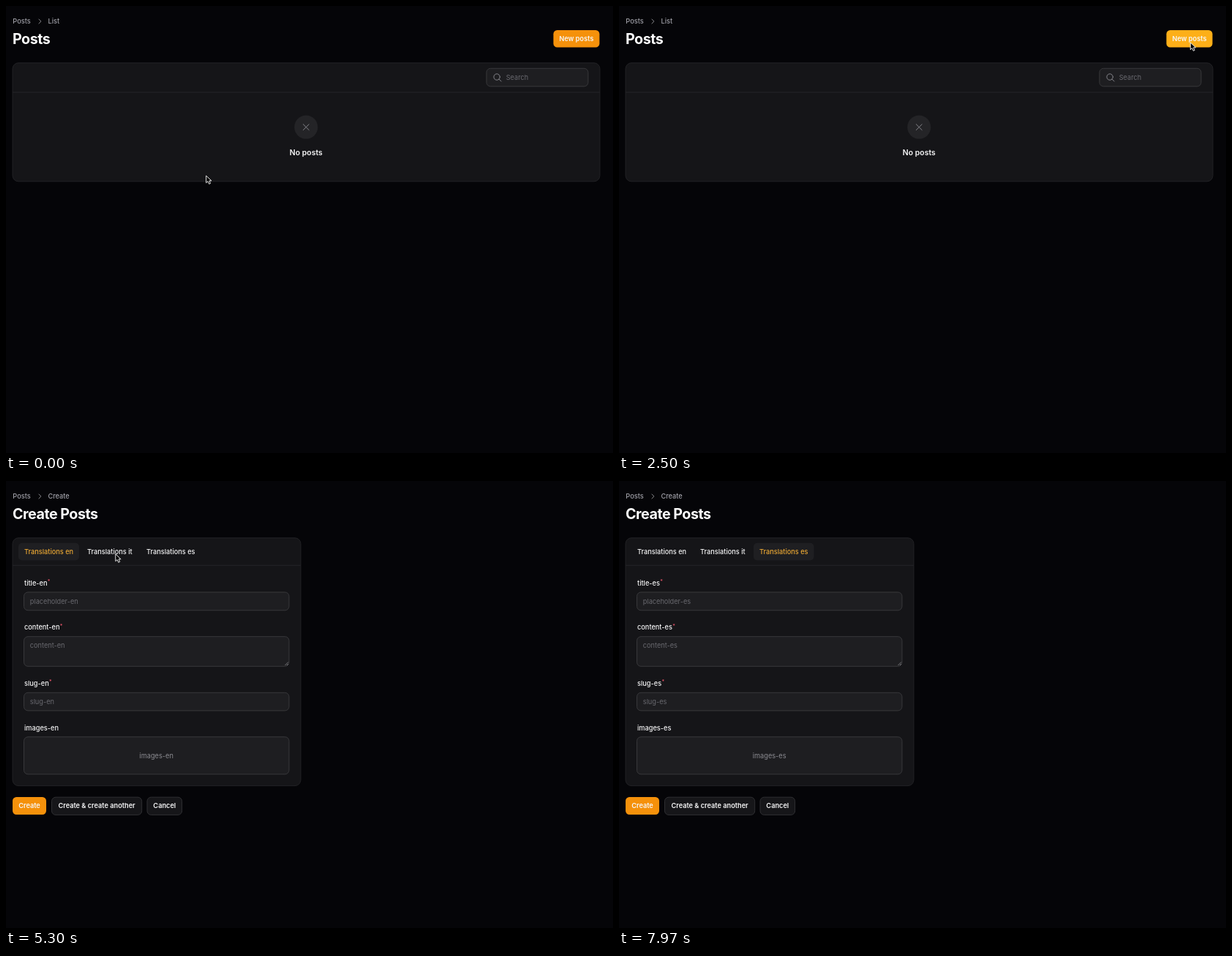
These frames come from a looping animation (830x611 px, 8 s). An HTML page:

```html
<!DOCTYPE html>
<html lang="en">
<head>
<meta charset="utf-8">
<title>Posts</title>
<style>
  html, body { margin: 0; width: 100%; height: 100%; overflow: hidden; background: #050508; }
  svg { display: block; width: 830px; height: 611px; }
  text { font: 500 9.2px Inter, sans-serif; font-optical-sizing: none; fill: #f7f7f8; white-space: pre; }
  .crumb { fill: #a0a0a8; }
  .heading { font-size: 19.65px; font-weight: 700; letter-spacing: -.025em; fill: #fff; }
  .bold { font-weight: 600; }
  .big { font-size: 10.5px; }
  .regular { font-weight: 400; }
  .hint { font-weight: 400; fill: #69696f; }
  .middle { text-anchor: middle; }
  .card { fill: #151518; stroke: #222225; }
  .field { fill: #1e1e21; stroke: #38383b; }
  .outline { fill: #161619; stroke: #2f2f32; }
  .primary { fill: #f5910b; }
  .rule { stroke: #252528; }
  .icon { fill: none; stroke: #85858b; stroke-linecap: round; stroke-linejoin: round; }
  .star { font-size: 7px; fill: #f0566b; }
</style>
</head>
<body>
<svg viewBox="0 0 830 611">
  <text class="crumb" x="9.3" y="24.3">Posts</text>
  <path class="icon" d="M44.9 18l3 3-3 3"/>
  <text class="crumb" id="crumb" x="57.5" y="24.3"></text>
  <text class="heading" id="heading" x="9" y="52"></text>
  <g id="list"></g>
  <g id="form"></g>
  <path id="cursor" d="M0 0V9.7L2.3 7.6L4 11.3L5.8 10.5L4.2 6.9H7.3Z" fill="#000" stroke="#fff" stroke-width=".9" stroke-linejoin="round"/>
</svg>
<script>
const LOOP = 8000;
const PAGE_OPEN = 3530, UPLOAD_READY = 3620, HOVER = 1680;
const $ = id => document.getElementById(id);

// Cursor stops: time, x, y; it eases from each one to the next.
const stops = [
  [0, 273.7, 232], [30, 273.7, 232], [370, 760, 90], [730, 760, 90],
  [1500, 787, 47.5], [1700, 787, 47.5], [2400, 781.3, 50], [3070, 781.3, 49.3],
  [4400, 781.3, 49.3], [5150, 150, 100], [6130, 147, 99.5], [6350, 147, 99.5],
  [6830, 197, 99], [7200, 230, 99], [LOOP, 230, 99]
];
const hidden = [[3700, 4390], [7900, LOOP]];

// Tabs: language, left edge, width, time of selection.
const tabs = [['en', 17, 83, 0], ['it', 103, 78, 5500], ['es', 184, 82.5, 7300]];

const box = (x, y, w, h, r, cls) =>
  `<rect class="${cls}" x="${x}" y="${y}" width="${w}" height="${h}" rx="${r}"/>`;
const label = (x, y, str, cls = '') => `<text class="${cls}" x="${x}" y="${y}">${str}</text>`;
const rule = (y, right) => `<path class="rule" d="M9 ${y}H${right}"/>`;

function listPage() {
  return box(748.5, 33, 63, 23.6, 5.2, 'primary" id="newButton') +
    label(780, 48.3, 'New posts', 'bold middle') +
    box(9, 77.8, 803, 162, 8, 'card') + rule(118, 812) +
    box(657, 85.3, 139, 24.6, 5.5, 'field') +
    '<g class="icon"><circle cx="671.2" cy="97" r="4.2"/><path d="M674.3 100.1l2.9 2.9"/></g>' +
    label(683.7, 101.1, 'Search', 'hint') +
    '<circle cx="410.3" cy="165.6" r="16" fill="#242427"/>' +
    '<path class="icon" d="M406.4 161.7l7.8 7.8m0-7.8l-7.8 7.8"/>' +
    label(410.3, 203.6, 'No posts', 'bold big middle');
}

function formPage(lang, uploadReady) {
  const required = (y, name) =>
    label(25, y, `${name}-${lang}<tspan class="star" dx=".3" dy="-2.6">*</tspan>`);
  const input = (y, h, hint) =>
    box(24.5, y, 362.5, h, 5.5, 'field') + label(32.8, y + 15.6, `${hint}-${lang}`, 'hint');
  const bar = uploadReady ? 432.2 : 401.8;
  const tabBar = tabs.map(([code, x, w]) => {
    const active = code === lang;
    return (active ? box(x, 84.8, w, 23.6, 5, '" fill="#1f1f22') : '') +
      `<text x="${x + 8.1}" y="99.9"${active ? ' style="fill:#eba834"' : ''}>Translations ${code}</text>`;
  }).join('');
  const upload = uploadReady
    ? box(24.5, 349.8, 362.5, 51, 5.5, 'field') +
      `<text class="regular middle" x="205.7" y="379" style="fill:#8c8c92">images-${lang}</text>`
    : box(25, 350.3, 58.7, 19.8, 0, '" fill="#606063') +
      label(30, 364, 'Scegli file', 'regular big') +
      label(86.4, 364, 'Nessun file selezionato', 'regular big');

  return box(9, 77.8, 394, bar - 93.4, 8, 'card') + rule(115.3, 403) + tabBar +
    required(142.6, 'title') + input(152, 24.8, 'placeholder') +
    required(203.3, 'content') + input(212.7, 40.6, 'content') +
    '<path d="M381.5 252l4.5-4.5m-2 4.5l2-2" stroke="#a0a0a4" stroke-width=".7"/>' +
    required(279.8, 'slug') + input(289.3, 24.6, 'slug') +
    label(25, 340.6, `images-${lang}`) + upload +
    box(9, bar - .3, 46, 24, 5.2, 'primary') + label(32, bar + 15.2, 'Create', 'bold middle') +
    box(62.5, bar, 123.2, 24.2, 5.5, 'outline') +
    label(124.1, bar + 15.2, 'Create &amp; create another', 'bold middle') +
    box(193, bar, 47.6, 24.2, 5.5, 'outline') + label(216.8, bar + 15.2, 'Cancel', 'bold middle');
}

function cursorAt(t) {
  const i = stops.findIndex(s => s[0] > t);
  const [t0, x0, y0] = stops[i - 1], [t1, x1, y1] = stops[i];
  const u = (t - t0) / (t1 - t0), e = u * u * (3 - 2 * u);
  return [x0 + (x1 - x0) * e, y0 + (y1 - y0) * e];
}

let shown = '';
function render(t) {
  const onForm = t >= PAGE_OPEN;
  const lang = tabs.filter(tab => t >= tab[3]).pop()[0];
  const ready = t >= UPLOAD_READY;
  const state = [onForm, lang, ready].join();
  if (state !== shown) {
    shown = state;
    $('crumb').textContent = onForm ? 'Create' : 'List';
    $('heading').textContent = onForm ? 'Create Posts' : 'Posts';
    $('list').innerHTML = onForm ? '' : listPage();
    $('form').innerHTML = onForm ? formPage(lang, ready) : '';
  }
  if (!onForm) {
    const k = Math.min(1, Math.max(0, (t - HOVER) / 75));
    $('newButton').style.fill = `rgb(${245 + 8 * k},${145 + 30 * k},${11 + 13 * k})`;
  }
  $('cursor').setAttribute('transform', `translate(${cursorAt(t)})`);
  $('cursor').style.display = hidden.some(([a, b]) => t >= a && t < b) ? 'none' : '';
}

const start = performance.now();
function tick() {
  render((performance.now() - start) % LOOP);
  requestAnimationFrame(tick);
}
tick();
</script>
</body>
</html>
```
